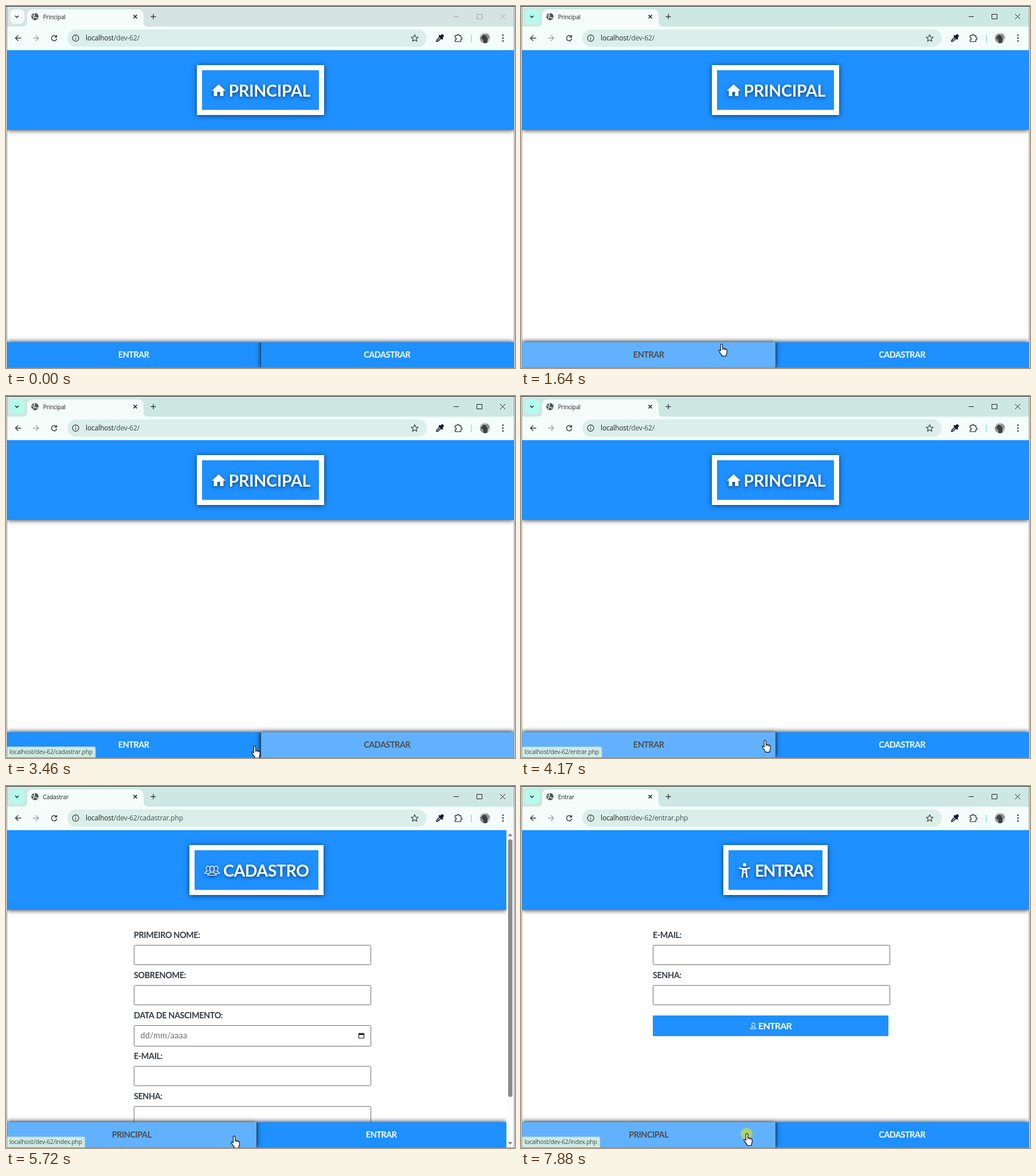
An HTML page with a canvas that plays this animation: 888 px wide and 631 px high, repeating every 8 s.

```html
<!DOCTYPE html>
<html lang="pt-BR">
<head>
<meta charset="utf-8">
<title>Principal</title>
<style>
  html, body { margin: 0; width: 100%; height: 100%; overflow: hidden; background: #fff; }
  canvas { display: block; }
</style>
</head>
<body>
<canvas id="stage" width="888" height="631"></canvas>
<script>
const ctx = document.getElementById('stage').getContext('2d');
const LOOP = 8000;
const BLUE = '#1e90ff', INK = '#1f2322';
const TITLE = 'Lato, sans-serif', UI = '"Open Sans", "Noto Sans", sans-serif';
const HOST = 'localhost';

const PAGES = {
  home: { tab: 'Principal', path: '/dev-62/', right: 886, left: 'ENTRAR', next: 'CADASTRAR', body: drawHome },
  join: { tab: 'Cadastrar', path: '/dev-62/cadastrar.php', right: 873, left: 'PRINCIPAL', next: 'ENTRAR', body: drawJoin },
  login: { tab: 'Entrar', path: '/dev-62/entrar.php', right: 886, left: 'PRINCIPAL', next: 'CADASTRAR', body: drawLogin }
};

// Each entry holds from its time until the next one.
const pageSteps = [[0, 'home'], [5150, 'join'], [6230, 'home'], [7320, 'login']];
const statusSteps = [[0, ''], [3000, 'cadastrar'], [3600, 'entrar'], [4200, 'cadastrar'],
  [5150, ''], [5450, 'index'], [6230, 'entrar'], [7420, 'index']];
const clicks = [[4840, 5000], [6030, 6180], [7110, 7270], [7880, 8000]];

// Pointer path: time, x, y
const route = [[330, 800, 123], [560, 610, 140], [800, 392, 170], [940, 380, 240], [1120, 377, 478],
  [1170, 376, 490], [1450, 362, 575], [1640, 350, 590], [1940, 300, 600], [1990, 305, 600],
  [2360, 430, 590], [2730, 541.5, 599], [2930, 541.5, 599], [3380, 448, 610], [3460, 434, 611],
  [3660, 385, 609], [3920, 385, 609], [4300, 450, 596], [4630, 481, 590], [5080, 481, 590],
  [5500, 425, 607], [5720, 398, 611], [6030, 397, 610.5], [6790, 397, 610.5], [6890, 394, 606.5], [8000, 394, 606.5]];

const held = (steps, t) => steps.filter(s => s[0] <= t).pop()[1];

// Monotone cubic interpolation keeps pauses still and never overshoots.
function along(t, axis) {
  let i = 0;
  while (i < route.length - 2 && route[i + 1][0] <= t) i++;
  const slope = n => route[n] && route[n + 1]
    ? (route[n + 1][axis] - route[n][axis]) / (route[n + 1][0] - route[n][0]) : 0;
  const tangent = n => {
    const a = slope(n - 1), b = slope(n);
    return a * b <= 0 ? 0 : 2 * a * b / (a + b);
  };
  const span = route[i + 1][0] - route[i][0];
  const u = Math.max(0, Math.min(1, (t - route[i][0]) / span)), v = 1 - u;
  return route[i][axis] * (1 + 2 * u) * v * v + tangent(i) * span * u * v * v
    + route[i + 1][axis] * u * u * (3 - 2 * u) - tangent(i + 1) * span * u * u * v;
}

function box(x, y, w, h, fill, radius = 0) {
  ctx.fillStyle = fill;
  ctx.beginPath();
  ctx.roundRect(x, y, w, h, radius);
  ctx.fill();
}

function disc(x, y, r, fill) {
  ctx.fillStyle = fill;
  ctx.beginPath();
  ctx.arc(x, y, r, 0, Math.PI * 2);
  ctx.fill();
}

function text(str, x, y, font, color, tracking = 0, align = 'left') {
  ctx.font = font;
  ctx.letterSpacing = tracking + 'px';
  ctx.textAlign = align;
  ctx.fillStyle = color;
  ctx.fillText(str, x, y);
}

function shape(d, x, y, { fill, stroke, width = 1.3, scale = 1 }) {
  const path = new Path2D(d);
  ctx.save();
  ctx.translate(x, y);
  ctx.scale(scale, scale);
  ctx.lineWidth = width / scale;
  ctx.lineJoin = 'round';
  if (fill) { ctx.fillStyle = fill; ctx.fill(path); }
  if (stroke) { ctx.strokeStyle = stroke; ctx.stroke(path); }
  ctx.restore();
}

function shadowed(color, blur, dy, draw) {
  ctx.save();
  ctx.shadowColor = color;
  ctx.shadowBlur = blur;
  ctx.shadowOffsetY = dy;
  draw();
  ctx.restore();
}

function drawTabs(page, active) {
  box(2, 1, 884, 36, active ? '#cde8e2' : '#d6e4e1');
  box(7, 6, 25, 25, active ? '#b5fbec' : '#f4fdfa', 8);
  shape('M-3-1.5L0 1.5 3-1.5', 19, 18.5, { stroke: INK, width: 1.5 });
  shape('M29 36q8 0 8-8v-12q0-10 10-10h183q10 0 10 10v12q0 8 8 8v2h-219z', 0, 0, { fill: '#f4fdfa' });
  disc(50.5, 18.5, 6.2, '#4b504f');
  shape('M-4.8-1.5q3 1 4 0t-1-3l2-1M-3 4.5q0-3 2-3.5t3 1 3-.5', 50.5, 18.5, { stroke: '#e9f1ef', width: 1.4 });
  text(page.tab, 64.5, 22.5, '10.3px ' + UI, INK, -0.25);
  shape('M-3-3L3 3M3-3L-3 3', 225.5, 18.5, { stroke: INK, width: 1.6 });
  shape('M-4.5 0h9M0-4.5v9', 257, 18.5, { stroke: '#39403e', width: 1.4 });
  const tone = active ? '#222' : '#9aa3a1';
  shape('M781 18.5h9M821.5 14.5h9v8h-9zM862 14l9 9M871 14l-9 9', 0, 0, { stroke: tone, width: 1 });
}

function drawToolbar(page) {
  box(2, 36, 884, 41, '#f4fdfa');
  box(107, 41, 627, 30, '#dbeee9', 15);
  const arrow = 'M5.5 0h-10M.3-4.8L-4.5 0 .3 4.8';
  shape(arrow, 21, 56, { stroke: '#39403e', width: 1.5 });
  shape('M-5.5 0h10M-.3-4.8L4.5 0-.3 4.8', 52.5, 56, { stroke: '#9aa6a3', width: 1.4 });
  shape('M3.6-2.8A4.6 4.6 0 1 0 4.6 1M4.4-5.3v3.5H.9', 84, 56, { stroke: '#39403e', width: 1.5 });
  shape('M5.5 0a5.5 5.5 0 1 1-11 0a5.5 5.5 0 1 1 11 0M0-.5v3.3M0-3v1.3', 121.5, 56, { stroke: '#39403e', width: 1.3 });
  text(HOST, 139, 60.3, '12px ' + UI, INK, -0.15);
  text(page.path, 139 + ctx.measureText(HOST).width, 60.3, '12px ' + UI, '#46524f', -0.15);
  shape('M0-6l1.8 4 4.3.4-3.3 2.9 1 4.2L0 3.3-3.8 5.5l1-4.2-3.3-2.9 4.3-.4z', 713, 56, { stroke: '#39403e', width: 1.2 });
  shape('M-6 6l.8-3 5-5 2.2 2.2-5 5z', 757, 56, { fill: '#9cc4f5', stroke: '#111', width: 1.3 });
  shape('M-1.8-3.6l1.2-1.2 1.5 1.2 2-2q1.4-.9 2.6.3t.3 2.6l-2 2 1.2 1.5-1.2 1.2z', 757, 56, { fill: '#101522', stroke: '#101522' });
  shape('M-6-4.5h3.4q0-2 1.7-2t1.7 2H4v3.4q2.2 0 2.2 1.8T4 2.5v3.6H-6V3q2.2 0 2.2-1.8T-6-.7z', 789.5, 56, { stroke: '#39403e', width: 1.4 });
  box(811, 50, 1.5, 13, '#8ee0d2');
  drawAvatar(835.5, 56);
  for (const y of [51, 56, 61]) disc(867, y, 1.4, '#39403e');
}

function drawAvatar(x, y) {
  ctx.save();
  ctx.beginPath();
  ctx.arc(x, y, 9, 0, 7);
  ctx.clip();
  box(x - 9, y - 9, 18, 18, '#8d918f');
  shape('M-9-3l8-6h5l-8 9zM2 3l7-4v10H4z', x, y, { fill: '#c3c8c6' });
  shape('M-4-5q4-3 6 1l3 5-1 8h-6l-1-6-4-4z', x, y, { fill: '#3d4040' });
  ctx.restore();
}

function drawHeader(page, x, w) {
  shadowed('rgba(0,0,0,.75)', 8, 1, () => box(2, 77, page.right - 2, 139, BLUE));
  shadowed('rgba(0,0,0,.6)', 9, 1, () => box(x, 103, w, 87, '#fff'));
  box(x + 9, 112, w - 18, 69, BLUE);
}

function heading(str, x, tracking, icon) {
  shadowed('rgba(0,0,0,.55)', 6, 2, () => {
    icon();
    text(str, x, 157.8, 'bold 28.5px ' + TITLE, '#fff', tracking);
  });
}

function drawUser(x, y, scale, width) {
  shape('M0-8q4 0 4 4.500T1.500 2v1.500q6 .8 6 4.500h-15q0-3.700 6-4.500V2Q-4 1-4-3.500T0-8z',
    x, y, { stroke: '#fff', scale, width });
}

function field(label, x, y, height = 34) {
  text(label, x, y - 12.3, 'bold 14.4px ' + TITLE, '#343a40', -0.4);
  ctx.strokeStyle = '#6b6b6b';
  ctx.lineWidth = 1;
  ctx.beginPath();
  ctx.roundRect(x + 0.5, y + 0.5, 413, height, 2);
  ctx.stroke();
}

function drawHome(page) {
  drawHeader(page, 333, 222);
  heading('PRINCIPAL', 388.5, -0.2, () =>
    shape('M10 20v-6h4v6h5v-8h3L12 3 2 12h3v8z', 356.6, 133, { fill: '#fff', scale: 1.2 }));
}

function drawJoin(page) {
  drawHeader(page, 320, 234);
  heading('CADASTRO', 379, -0.45, () => {
    drawUser(352.5, 146, 0.8, 1.2);
    drawUser(366.5, 146, 0.8, 1.2);
    box(355.5, 140, 8, 13, BLUE);
    drawUser(359.5, 147.5, 0.98, 1.4);
  });
  field('PRIMEIRO NOME:', 223, 277);
  field('SOBRENOME:', 223, 347);
  field('DATA DE NASCIMENTO:', 223, 417, 36);
  field('E-MAIL:', 223, 488);
  field('SENHA:', 223, 558);
  text('dd/mm/aaaa', 234.5, 440, '14.4px ' + TITLE, '#6f6f6f', 0.1);
  shape('M615.500 431.500h9v8h-9zM617.500 430v2M622.500 430v2', 0, 0, { stroke: '#222', width: 1.2 });
  box(615, 431, 10, 3, '#222');
  drawScrollbar();
}

function drawScrollbar() {
  box(873, 77, 13, 553, '#fcfcfc');
  box(876, 93, 7.5, 449, '#8b8b8b', 3.75);
  shape('M-4 2.500L0-2.500 4 2.500z', 879.7, 85, { fill: '#858585' });
  shape('M-4-2.500L0 2.500 4-2.500z', 879.7, 623, { fill: '#858585' });
}

function drawLogin(page) {
  drawHeader(page, 353, 182);
  heading('ENTRAR', 408, -1.8, () => {
    disc(390, 137.3, 3, '#fff');
    shape('M380 141.500l6.500 1.500h7l6.500-1.500v2.300l-6 1.500 1.500 14.700h-2.500l-1.500-8h-3l-1.500 8h-2.500l1.500-14.700-6-1.500z',
      0, 0, { fill: '#fff' });
    shape('M388.500 146.500h3v4h-3z', 0, 0, { fill: BLUE });
  });
  field('E-MAIL:', 230, 277);
  field('SENHA:', 230, 347);
  box(230, 400, 411, 36, BLUE);
  drawUser(405.3, 418, 0.66, 1.1);
  text('ENTRAR', 414, 424, 'bold 16px ' + TITLE, '#fff', -0.8);
}

function drawFooter(page, hover) {
  const split = page.right === 886 ? 444 : 437;
  const button = (label, x, end, lit) => {
    shadowed(lit ? 'rgba(0,0,0,.95)' : 'rgba(0,0,0,.75)', 8, -1, () =>
      box(x, 586, end - x, 44, lit ? '#62b1ff' : BLUE));
    text(label, (x + end) / 2 - 0.3, 612.7, 'bold 14.4px ' + TITLE, lit ? '#4d4d4d' : '#fff', -0.45, 'center');
  };
  ctx.save();
  ctx.beginPath();
  ctx.rect(2, 570, page.right - 2, 60);
  ctx.clip();
  // Solid strip below both buttons hides each one's side shadow.
  if (hover === 'left') {
    button(page.next, split, page.right, false);
    button(page.left, 2, split, true);
  } else {
    button(page.left, 2, split, false);
    button(page.next, split, page.right, hover === 'right');
  }
  box(split, 586, 1, 44, '#26425f');
  ctx.restore();
}

function drawStatus(name) {
  if (!name) return;
  const label = `${HOST}/dev-62/${name}.php`;
  ctx.font = '10.4px ' + UI;
  ctx.letterSpacing = '-0.2px';
  const width = ctx.measureText(label).width + 9.5;
  box(2, 611, width, 19, '#a9cfd0', [0, 3, 0, 0]);
  box(2, 612, width - 1, 18, '#cfe9e3', [0, 3, 0, 0]);
  text(label, 6, 624.3, '10.4px ' + UI, '#3f4a48', -0.2);
}

function hoverAt(t, page) {
  if (t < route[0][0] || along(t, 2) < 586) return '';
  return along(t, 1) < (page.right === 886 ? 444 : 437) ? 'left' : 'right';
}

function drawPointer(t, hand) {
  if (t < route[0][0]) return;
  const x = along(t, 1), y = along(t, 2);
  if (clicks.some(([from, to]) => t >= from && t < to)) disc(x - 0.5, y, 10.5, 'rgba(220,230,30,.6)');
  if (!hand) {
    shape('M0 0v15.500l3.600-3.400 2.400 5.600 2.400-1-2.400-5.500h5z', x, y, { fill: '#fff', stroke: '#111', width: 1 });
    return;
  }
  shape('M-1.600 .8q0-1.600 1.600-1.600t1.700 1.600v5.700l5.600 1.300q2 .5 2 2.300v3.300q0 2-1.200 4v2.600h-8v-2q-2.600-3-4.700-6.200-.9-1.700 .2-2.200 1.200-.4 2.800 1.600z',
    x, y, { fill: '#fff', stroke: '#111', width: 1.2 });
  shape('M1.700 6v3.500M4.300 7v2.800M6.900 7.700v2.500', x, y, { stroke: '#111', width: 1 });
}

function drawFrame() {
  box(0, 0, 888, 631, '#f3f3f3');
  box(0, 0, 888, 1, '#1b1b1b');
  box(1, 1, 886, 630, '#858a89');
}

function render(t) {
  const page = PAGES[held(pageSteps, t)];
  const hover = hoverAt(Math.max(0, t - 60), page);
  drawFrame();
  box(2, 77, 884, 553, '#fff');
  ctx.save();
  ctx.beginPath();
  ctx.rect(2, 77, 884, 553);
  ctx.clip();
  page.body(page);
  drawFooter(page, hover);
  drawStatus(held(statusSteps, t));
  ctx.restore();
  drawTabs(page, t >= 50);
  drawToolbar(page);
  drawPointer(t, hover);
}

function tick() {
  render(performance.now() % LOOP);
  requestAnimationFrame(tick);
}
tick();
</script>
</body>
</html>
```
